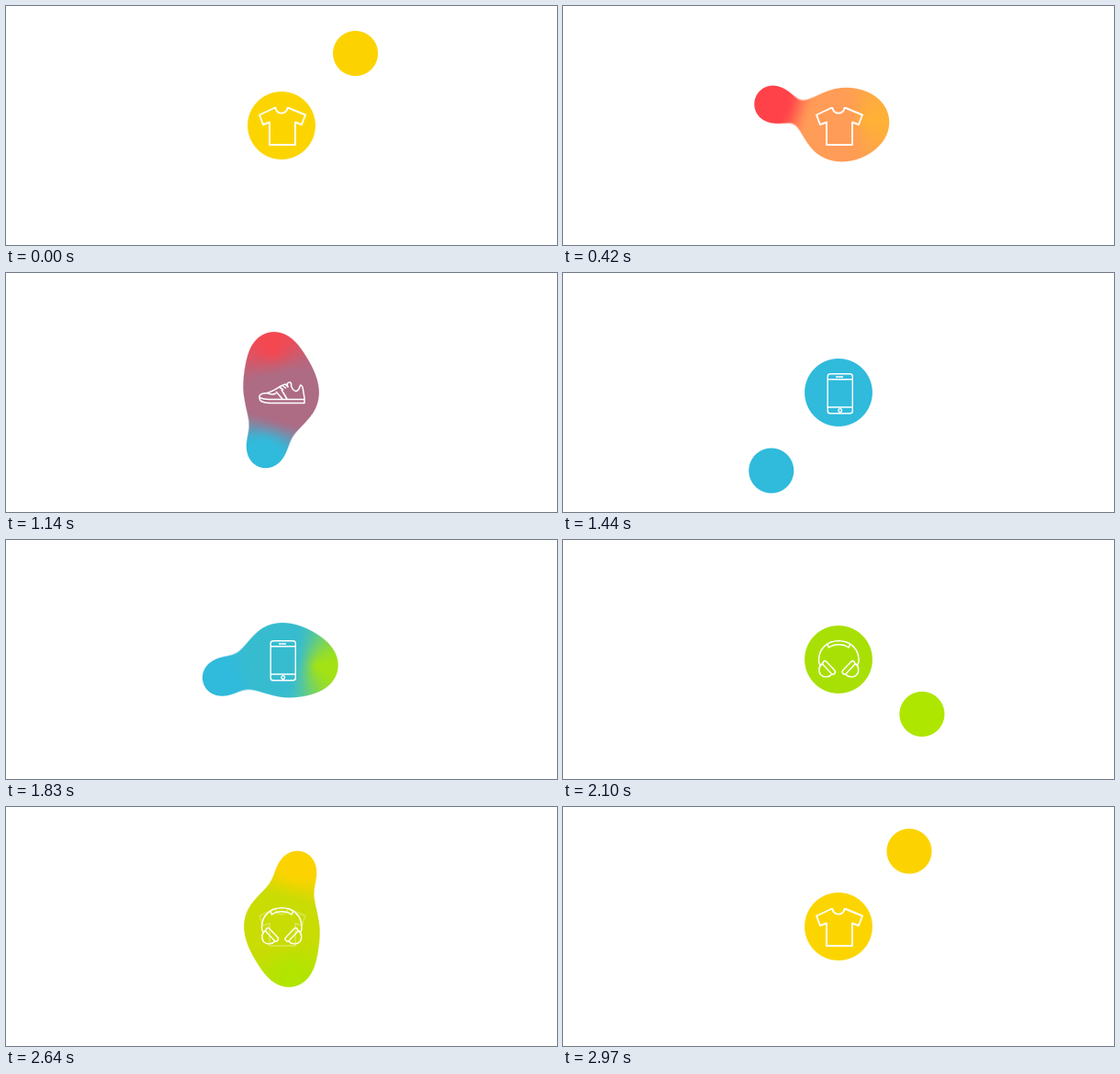
Write an HTML page with a canvas that moves like this. It is 600 by 260 pixels and loops after 3 s.

```html
<!DOCTYPE html>
<html lang="en">
<head>
<meta charset="utf-8">
<title>Gooey icons</title>
<style>
html, body { margin: 0; width: 100%; height: 100%; overflow: hidden; background: #fff; }
canvas { display: block; width: 600px; height: 260px; }
</style>
</head>
<body>
<canvas id="stage" width="600" height="260"></canvas>
<script>
const LOOP = 3000, STEP = 750;
const CX = 300, CY = 130, CORE_R = 36.9;
const PEAK = 742, HALF = 479, REACH = 112.4;
const BLEND = 44;
const BOX = { x: 170, y: 0, w: 260, h: 260 };

// Order: red, blue, green, yellow
const coreColors = [[255, 56, 75], [48, 186, 220], [168, 224, 5], [252, 213, 0]];
const dropColors = [[255, 66, 73], [48, 186, 220], [174, 230, 0], [252, 211, 0]];
const ORANGE = [255, 156, 88];

const ctx = document.getElementById('stage').getContext('2d');
const image = ctx.createImageData(BOX.w, BOX.h);

const clamp = v => Math.max(0, Math.min(1, v));
const wrap = v => ((v % LOOP) + LOOP) % LOOP;
const mix = (a, b, u) => a.map((v, i) => v + (b[i] - v) * u);
function smooth(from, to, v) {
  const u = clamp((v - from) / (to - from));
  return u * u * (3 - 2 * u);
}

// Union of two distance fields with a soft neck between them
function join(a, b) {
  const h = Math.max(BLEND - Math.abs(a - b), 0) / BLEND;
  return Math.min(a, b) - h * h * BLEND / 4;
}

function coreAt(t) {
  const local = wrap(t - 320);
  const next = Math.floor(local / STEP);
  const u = clamp((local % STEP) / 180);
  let color = mix(coreColors[(next + 3) % 4], coreColors[next], u);
  if (next === 0) color = mix(color, ORANGE, 4 * u * (1 - u));
  const swell = (t % STEP - 367) / 50;
  return { r: CORE_R + 5 * Math.exp(-swell * swell), color };
}

function dropsAt(t, core) {
  const drops = [];
  for (let i = 0; i < 4; i++) {
    const shift = wrap(t - i * STEP) - PEAK;
    const gap = Math.abs(shift);
    if (gap >= HALF) continue;
    const reach = REACH * (1 - Math.pow(gap / HALF, 2.77));
    const angle = (225 - 90 * i + shift * 0.084) * Math.PI / 180;
    const fade = shift > 0 ? smooth(380, 476, shift) : 0;
    drops.push({
      x: CX + reach * Math.cos(angle),
      y: CY + reach * Math.sin(angle),
      r: 24.5 - 4.8 * smooth(230, 340, gap) - 28 * smooth(430, HALF, gap),
      color: mix(dropColors[i], core.color, fade)
    });
  }
  return drops;
}

function drawBlob(t) {
  const core = coreAt(t), drops = dropsAt(t, core), data = image.data;
  let p = 0;
  for (let j = 0; j < BOX.h; j++) {
    for (let i = 0; i < BOX.w; i++, p += 4) {
      const x = BOX.x + i + 0.5, y = BOX.y + j + 0.5;
      const base = Math.hypot(x - CX, y - CY) - core.r;
      let d = base;
      let [r, g, b] = core.color;
      for (const s of drops) {
        const ds = Math.hypot(x - s.x, y - s.y) - s.r;
        d = join(d, ds);
        const w = smooth(30, -30, ds - base);
        r += (s.color[0] - r) * w;
        g += (s.color[1] - g) * w;
        b += (s.color[2] - b) * w;
      }
      const a = clamp(0.5 - d);
      data[p] = 255 + (r - 255) * a;
      data[p + 1] = 255 + (g - 255) * a;
      data[p + 2] = 255 + (b - 255) * a;
      data[p + 3] = 255;
    }
  }
  ctx.putImageData(image, BOX.x, BOX.y);
}

const shoe = new Path2D(
  'M276 136C275 132 279 131 284 130.500C292 129 297 123 304 121L307 124' +
  'L306 120.500Q309 117.500 310.500 120C310 124 313 129 316 128.500Q319 128 320.500 122' +
  'Q323 122 323.500 127L325 136V141.500H287Q276 141 276 136Z' +
  'M276 135.500Q281 138 289 137.500H325M284 130.500Q290 133 294 131' +
  'M294 129L301 137M300 127L306 137M298 124.500L302 127M301 122.500L305 125.500');

const phone = new Path2D(
  'M291 109.800H312.500Q315.300 109.800 315.300 112.600V150Q315.300 152.800 312.500 152.800' +
  'H291Q288.200 152.800 288.200 150V112.600Q288.200 109.800 291 109.800Z' +
  'M288.200 115.800H315.300M288.200 146H315.300M297 113H305' +
  'M303.500 149.400A1.800 1.800 0 1 1 299.900 149.400A1.800 1.800 0 1 1 303.500 149.400');

const halfSet = new Path2D(
  'M300.300 109.800C287 109.800 278.500 119 278.500 131Q278.500 134 280 136' +
  'M300.300 113.800Q294 113.800 289.500 117L288 113.500' +
  'M283.500 132.500Q285 130.500 287 132.500L296 142Q297.300 144 295.500 145.500' +
  'Q294 147 292 145L283.500 136Q282 134.500 283.500 132.500Z' +
  'M282.500 134.500C278 137 278 143 280.500 146.500C284 150 290 149.500 293 146');
const headset = new Path2D(halfSet);
headset.addPath(halfSet, new DOMMatrix([-1, 0, 0, 1, 600.6, 0]));

const shirt = new Path2D(
  'M292 111L276 118.500L280 129L287 126.500V151H315V126.500L322 129L326 118.500L308 111' +
  'H306.500C305.500 118.500 294.500 118.500 293.500 111Z');

const icons = [
  { path: shoe, width: 1.5 },
  { path: phone, width: 1.4 },
  { path: headset, width: 1.5 },
  { path: shirt, width: 1.9 }
];

function drawIcons(t) {
  ctx.strokeStyle = '#fff';
  ctx.lineJoin = 'round';
  const local = wrap(t - 420);
  const now = Math.min(3, Math.floor(local / 730));
  const u = clamp((local - now * 730) / 120);
  const stroke = (icon, alpha) => {
    ctx.globalAlpha = alpha;
    ctx.lineWidth = icon.width;
    ctx.stroke(icon.path);
  };
  stroke(icons[(now + 3) % 4], 1 - u * u);
  stroke(icons[now], u);
  ctx.globalAlpha = 1;
}

const start = performance.now();
function draw() {
  const t = wrap(performance.now() - start);
  drawBlob(t);
  drawIcons(t);
  requestAnimationFrame(draw);
}
draw();
</script>
</body>
</html>
```
